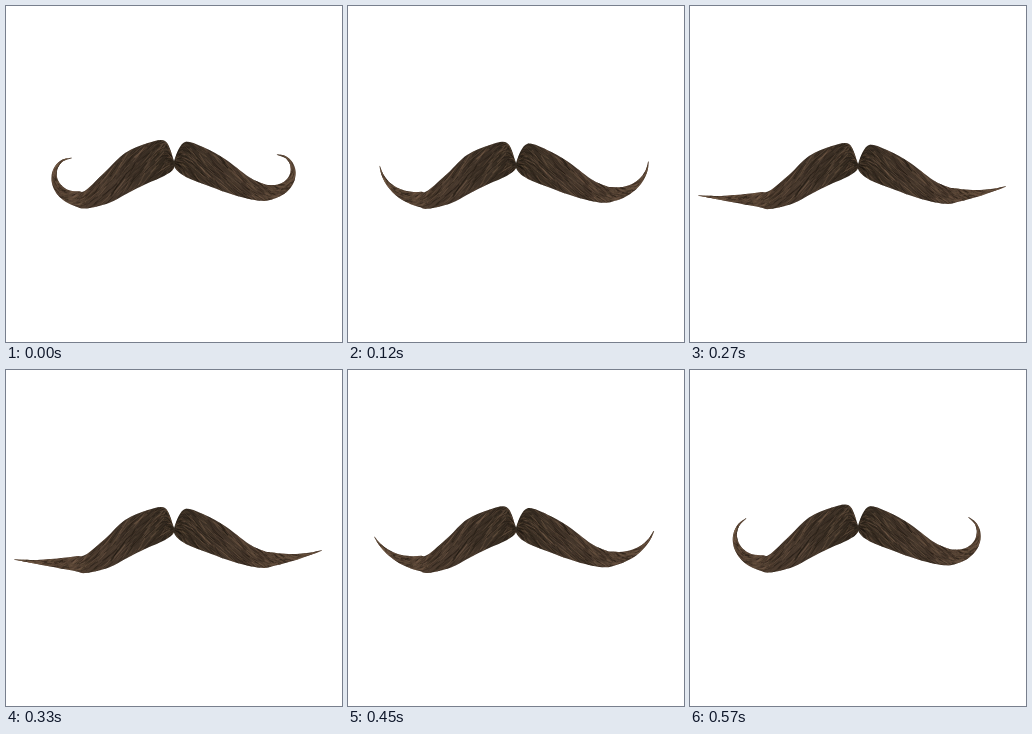
An HTML page with a canvas for the animation above (0.6 s loop, 336 px wide and 336 px high).

```html
<!DOCTYPE html>
<html lang="en">
<head>
<meta charset="utf-8">
<title>Moustache</title>
<style>
html, body { margin: 0; width: 100%; height: 100%; overflow: hidden; background: #fff; }
canvas { display: block; width: 336px; height: 336px; }
</style>
</head>
<body>
<canvas id="stage" width="336" height="336"></canvas>
<script>
const ctx = document.getElementById('stage').getContext('2d');
const LOOP = 600, STEP = 30, JOINTS = 8;

// upper, lower: key points of the edges from the middle outwards.
// root: where the tail starts; turn: how far it bends, stretched and curled.
const left = {
  side: 1, sink: 0.5, root: [80, 193.3], girth: 8.8, turn: [3, 180],
  upper: [[167, 152], [159, 135], [142, 137], [119, 147], [100, 165]],
  lower: [[168, 162], [158, 170], [141, 177.5], [122, 187], [103, 197]],
  length: curl => 71 - 9 * Math.exp(-Math.pow((curl - 0.53) / 0.17, 2))
};
const right = {
  side: -1, sink: 3, root: [258, 186.5], girth: 8, turn: [15, 180],
  upper: [[169, 152], [179, 136], [199, 142], [219, 153], [243, 171]],
  lower: [[169, 162], [180, 171], [200, 179], [222, 187], [243, 193]],
  length: curl => 58 + 7 * Math.pow(curl, 4)
};

const mix = (a, b, k) => a + (b - a) * k;
const mixPoint = (a, b, k) => [mix(a[0], b[0], k), mix(a[1], b[1], k)];

function random(seed) {
  return () => {
    seed = (seed * 1664525 + 1013904223) >>> 0;
    return seed / 4294967296;
  };
}

function makeHairs(seed) {
  const rnd = random(seed), hairs = [];
  for (let i = 0; i < 650; i++) {
    const s = 12 * Math.pow(rnd(), 1.4);
    const light = rnd() > 0.62 - s * 0.03;
    hairs.push({
      s, v: rnd() * 1.15 - 0.15,
      len: 0.3 + rnd() * 0.5,
      slant: 0.08 + rnd() * 0.2,
      width: 0.5 + rnd() * 0.7,
      color: light ? `rgba(118,94,74,${0.15 + rnd() * 0.35})` : `rgba(30,23,16,${0.15 + rnd() * 0.35})`
    });
  }
  return hairs;
}
left.hairs = makeHairs(17);
right.hairs = makeHairs(91);

// The tail has a heading that turns upwards more and more towards the tip.
function addTail(wing, curl, drop, upper, lower) {
  const turn = mix(...wing.turn, Math.pow(curl, 1.65)) * Math.PI / 180;
  const heading = s => turn * Math.pow(s, 1.05 + 0.4 * curl);
  const step = wing.length(curl) / JOINTS;
  let [x, y] = wing.root;
  y += wing.sink * drop;
  for (let i = 0; i <= JOINTS; i++) {
    const s = i / JOINTS, a = heading(s);
    const half = 0.4 + wing.girth * Math.pow(1 - s, 1.4);
    const nx = wing.side * Math.sin(a) * half, ny = -Math.cos(a) * half;
    upper.push([x + nx, y + ny]);
    lower.push([x - nx, y - ny]);
    const ahead = heading(s + 0.5 / JOINTS);
    x -= wing.side * Math.cos(ahead) * step;
    y -= Math.sin(ahead) * step;
  }
}

function edges(wing, curl) {
  const drop = Math.min(1, (1 - curl) * 1.6);
  const upper = wing.upper.map(([x, y]) => [x, y + 3 * drop]);
  const lower = wing.lower.map(([x, y]) => [x, y + wing.sink * drop]);
  addTail(wing, curl, drop, upper, lower);
  return { upper, lower };
}

function outline({ upper, lower }) {
  const p = upper.concat([...lower].reverse()), n = p.length;
  const path = new Path2D();
  path.moveTo(...p[0]);
  for (let i = 0; i < n; i++) {
    const a = p[(i + n - 1) % n], b = p[i], c = p[(i + 1) % n], e = p[(i + 2) % n];
    path.bezierCurveTo(
      b[0] + (c[0] - a[0]) / 6, b[1] + (c[1] - a[1]) / 6,
      c[0] - (e[0] - b[0]) / 6, c[1] - (e[1] - b[1]) / 6, c[0], c[1]);
  }
  path.closePath();
  return path;
}

// A place on the wing: s joints outwards, v from the upper to the lower edge.
function spot({ upper, lower }, s, v) {
  const i = Math.min(upper.length - 2, Math.floor(s)), k = Math.min(1, s - i);
  return mixPoint(mixPoint(upper[i], upper[i + 1], k), mixPoint(lower[i], lower[i + 1], k), v);
}

function drawWing(wing, curl) {
  const rim = edges(wing, curl), shape = outline(rim);
  const tint = ctx.createLinearGradient(168, 0, 168 - wing.side * 125, 0);
  tint.addColorStop(0, '#32291f');
  tint.addColorStop(0.45, '#44362b');
  tint.addColorStop(1, '#574334');
  ctx.save();
  ctx.fillStyle = tint;
  ctx.fill(shape);
  ctx.clip(shape);
  for (const h of wing.hairs) {
    ctx.strokeStyle = h.color;
    ctx.lineWidth = h.width;
    ctx.beginPath();
    ctx.moveTo(...spot(rim, h.s, h.v));
    ctx.quadraticCurveTo(
      ...spot(rim, h.s + h.len / 2, h.v + h.slant * 0.6),
      ...spot(rim, h.s + h.len, h.v + h.slant));
    ctx.stroke();
  }
  ctx.restore();
}

function draw(now) {
  const t = Math.floor((now % LOOP) / STEP) * STEP;
  const curl = Math.abs(1 - 2 * t / LOOP);
  ctx.fillStyle = '#fff';
  ctx.fillRect(0, 0, 336, 336);
  drawWing(left, curl);
  drawWing(right, curl);
}

let start;
function tick(now) {
  if (start === undefined) start = now;
  draw(now - start);
  requestAnimationFrame(tick);
}
draw(0);
requestAnimationFrame(tick);
</script>
</body>
</html>
```
